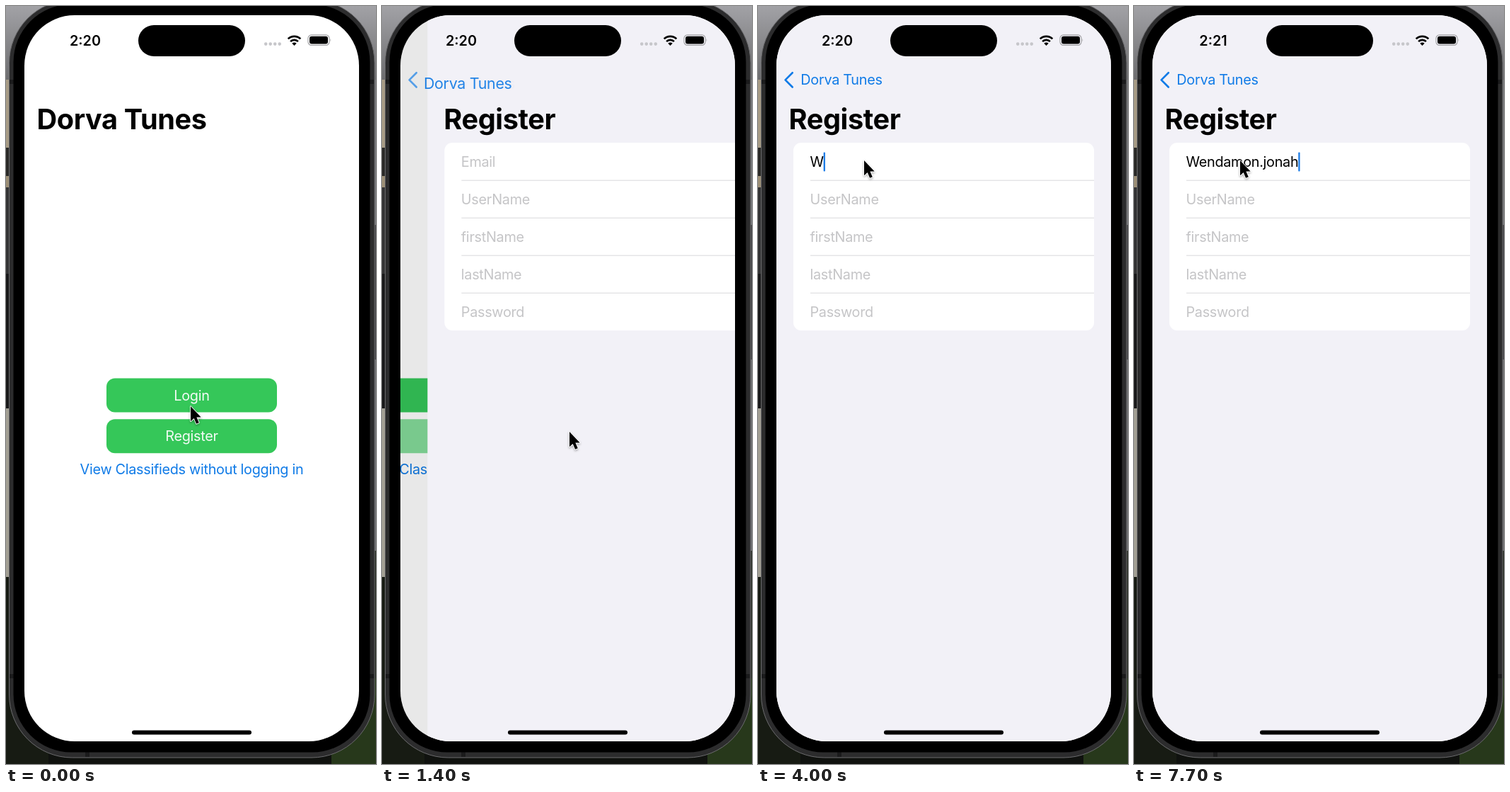
An HTML page that plays this animation: 523 by 1070 pixels, repeating every 8000 ms.

```html
<!DOCTYPE html>
<html lang="en">
<head>
<meta charset="utf-8">
<title>Register screen</title>
<style>
  html, body { margin: 0; width: 100%; height: 100%; overflow: hidden; background: #161815; }
  svg { display: block; width: 100vw; height: 100vh; }
  text { font: 19.84px Inter, Roboto, sans-serif; font-optical-sizing: none; letter-spacing: -.015em; white-space: pre; }
  .title { font-size: 39.7px; font-weight: 700; letter-spacing: -.01em; }
  .mid { text-anchor: middle; }
  .blue { fill: #107be7; }
  .hint { fill: #c5c5c7; }
  #clock { font-weight: 600; letter-spacing: 0; }
</style>
</head>
<body>
<svg viewBox="0 0 523 1070" xmlns="http://www.w3.org/2000/svg">
  <defs>
    <clipPath id="screen"><rect x="26" y="13" width="473" height="1025" rx="71"/></clipPath>
    <linearGradient id="sky" x1="0" x2="0" y1="0" y2="1">
      <stop offset="0" stop-color="#a2a2a6"/><stop offset="1" stop-color="#6d6d6f"/>
    </linearGradient>
    <filter id="shade" x="-50%" y="-50%" width="200%" height="200%">
      <feDropShadow dx="0" dy="1.5" stdDeviation="1.5" flood-opacity=".35"/>
    </filter>
  </defs>

  <g id="scenery"><rect width="523" height="104" fill="url(#sky)"/></g>

  <rect x="4.5" y="-8.5" width="516.5" height="1069.5" rx="89" fill="#2c2c2d" stroke="#6b6b6d"/>
  <g fill="#1b1b1c">
    <path d="M5 104h6v6h-6zM514 104h6v6h-6zM5 943h6v6h-6zM514 943h6v6h-6zM112 1053h6v7h-6z"/>
  </g>
  <rect x="10.5" y="-2.5" width="504" height="1056" rx="82"/>

  <g clip-path="url(#screen)">
    <rect x="26" y="13" width="473" height="1025" fill="#fff"/>
    <g id="home">
      <g fill="#35c759">
        <rect x="142" y="525.5" width="241" height="48" rx="12"/>
        <text class="mid" x="262.5" y="556.5" fill="#f3fbf5">Login</text>
        <g id="pressed">
          <rect x="142" y="583.3" width="241" height="48" rx="12"/>
          <text class="mid" x="262.5" y="614.3" fill="#f3fbf5">Register</text>
        </g>
      </g>
      <text class="mid blue" x="262.5" y="660.5">View Classifieds without logging in</text>
    </g>
    <rect id="dim" x="26" y="13" width="473" height="1025"/>

    <g id="form">
      <rect x="26" y="13" width="473" height="1025" fill="#f2f1f7"/>
      <rect x="50" y="193" width="425" height="265" rx="11" fill="#fff"/>
      <g id="rows"></g>
      <text id="typed" x="73.5" y="227.3"></text>
      <rect id="caret" y="206.5" width="2.3" height="27" rx="1" fill="#1b7be6"/>
    </g>
    <text id="heading" class="title" x="43.5" y="174.4">Register</text>
    <path id="chevron" d="M48.7 94.3 38.6 104.4l10.1 10.1" fill="none" stroke="#107be7" stroke-width="2.7" stroke-linecap="round" stroke-linejoin="round"/>
    <text id="back" class="blue">Dorva Tunes</text>
    <text id="large" class="title">Dorva Tunes</text>

    <text id="clock" class="mid" x="112" y="55.6"></text>
    <path d="M367.2 53.6h.01m6.5 0h.01m6.5 0h.01m6.5 0h.01" stroke="#c6c6ca" stroke-width="4.6" stroke-linecap="round"/>
    <path d="M398.7 46.4a12.5 12.5 0 0 1 17.6 0M402.1 50.1a7.7 7.7 0 0 1 10.8 0" fill="none" stroke="#000" stroke-width="2.7"/>
    <path d="M407.5 56l-3.2-3.2a4.5 4.5 0 0 1 6.4 0z"/>
    <rect x="427" y="40.8" width="30" height="14.6" rx="4.8" fill="none" stroke="#a3a3a6" stroke-width="1.2"/>
    <rect x="429" y="42.8" width="26" height="10.6" rx="3"/>
    <path d="M458.5 46q1.8 2.1 0 4.4z" fill="#a3a3a6"/>
    <rect x="187" y="27" width="151" height="44" rx="22"/>
    <rect x="178" y="1022.5" width="169" height="6" rx="3"/>
  </g>

  <path id="pointer" d="M0 0v21.3l4.7-4.3 3.4 7.8 3.7-1.6-3.4-7.6h6.3z" stroke="#fff" stroke-width="1.6" stroke-linejoin="round" paint-order="stroke" filter="url(#shade)"/>
</svg>
<script>
const LOOP = 8000, TICK = 100, WIDTH = 473;
const el = id => document.getElementById(id);
const mix = (a, b, k) => a + (b - a) * k;
const set = (id, attrs) => {
  for (const key in attrs) el(id).setAttribute(key, attrs[key]);
};

// Wallpaper slivers beside the phone: x, y, height, colour
const strips = [
  [0, 104, 96, '#a79b85'], [0, 200, 40, '#2a2927'], [0, 240, 16, '#9c8f76'],
  [0, 256, 122, '#343435'], [0, 378, 190, '#19191a'], [0, 568, 238, '#a29f94'],
  [0, 806, 264, '#171b13'], [261, 104, 205, '#77787b'], [261, 309, 190, '#424345'],
  [261, 499, 270, '#6e6f71'], [261, 769, 180, '#262b22'], [261, 949, 121, '#27381b']
];
el('scenery').innerHTML += strips.map(([x, y, h, c]) =>
  `<rect x="${x}" y="${y}" width="262" height="${h}" fill="${c}"/>`).join('') +
  '<rect x="60" y="1050" width="400" height="20" fill="#10120f"/>';

el('rows').innerHTML = ['Email', 'UserName', 'firstName', 'lastName', 'Password'].map((name, i) =>
  `<text class="hint" x="73.5" y="${227.3 + i * 53}">${name}</text>` +
  (i ? `<rect x="74" y="${192.6 + i * 53}" width="401" height="1.2" fill="#dfdfe2"/>` : '')).join('');
const emailHint = el('rows').firstChild;

const email = 'Wendamon.jonah';
const keyTimes = [3900, 4300, 4500, 4700, 5000, 5600, 5700, 5900, 6300, 6700, 7000, 7300, 7500, 7700];

// Pointer stops: time, x, y
const stops = [
  [0, 261, 565], [600, 265, 601], [2000, 265, 601], [2100, 180, 360], [2200, 72, 99],
  [2300, 118, 173], [2400, 118, 173], [2700, 168, 228], [2800, 168, 228],
  [3000, 150, 218], [LOOP, 150, 218]
];

function pointerAt(t) {
  const i = stops.findIndex(s => s[0] > t);
  const [t0, x0, y0] = stops[i - 1], [t1, x1, y1] = stops[i];
  const k = (t - t0) / (t1 - t0);
  return [mix(x0, x1, k), mix(y0, y1, k)];
}

function drawPush(t) {
  const rest = t < 1204 ? 1 : t >= 1900 ? 0 : Math.exp((1204 - t) / 78);
  const p = 1 - rest;
  set('home', { transform: `translate(${-0.3 * WIDTH * p})` });
  set('pressed', { opacity: p ? .6 : 1 });
  set('dim', { opacity: .1 * p });
  set('form', { transform: `translate(${WIDTH * rest})` });
  set('heading', { transform: `translate(${WIDTH * rest * 1.14})` });
  set('chevron', { opacity: Math.max(0, p * 4 - 3) });

  // The large title shrinks into the back label
  const place = { x: mix(43.5, 60.3, p), y: mix(174.4, 111.4, p ** 1.15) };
  const size = mix(39.7, 19.84, p) + 'px';
  set('back', { ...place, opacity: p });
  set('large', { ...place, opacity: rest ** 2 });
  el('back').style.fontSize = el('large').style.fontSize = size;
  el('back').style.fontWeight = Math.round(mix(700, 400, p));
}

function drawField(t) {
  const count = keyTimes.filter(k => k <= t).length;
  const typed = el('typed');
  typed.textContent = email.slice(0, count);
  emailHint.setAttribute('opacity', count ? 0 : 1);
  const blink = t < 2900 ? 0 : count || t < 3500 ? 1 : t < 3600 ? .5 : 0;
  set('caret', { x: count ? 73.4 + typed.getComputedTextLength() : 73.8, opacity: blink });
}

function draw(now) {
  // The screen refreshes ten times a second
  const t = Math.floor(now % LOOP / TICK) * TICK;
  drawPush(t);
  drawField(t);
  el('clock').textContent = t < 5300 ? '2:20' : '2:21';
  set('pointer', { transform: `translate(${pointerAt(t)})` });
}

const start = performance.now();
function loop() {
  draw(performance.now() - start);
  requestAnimationFrame(loop);
}
loop();
</script>
</body>
</html>
```
